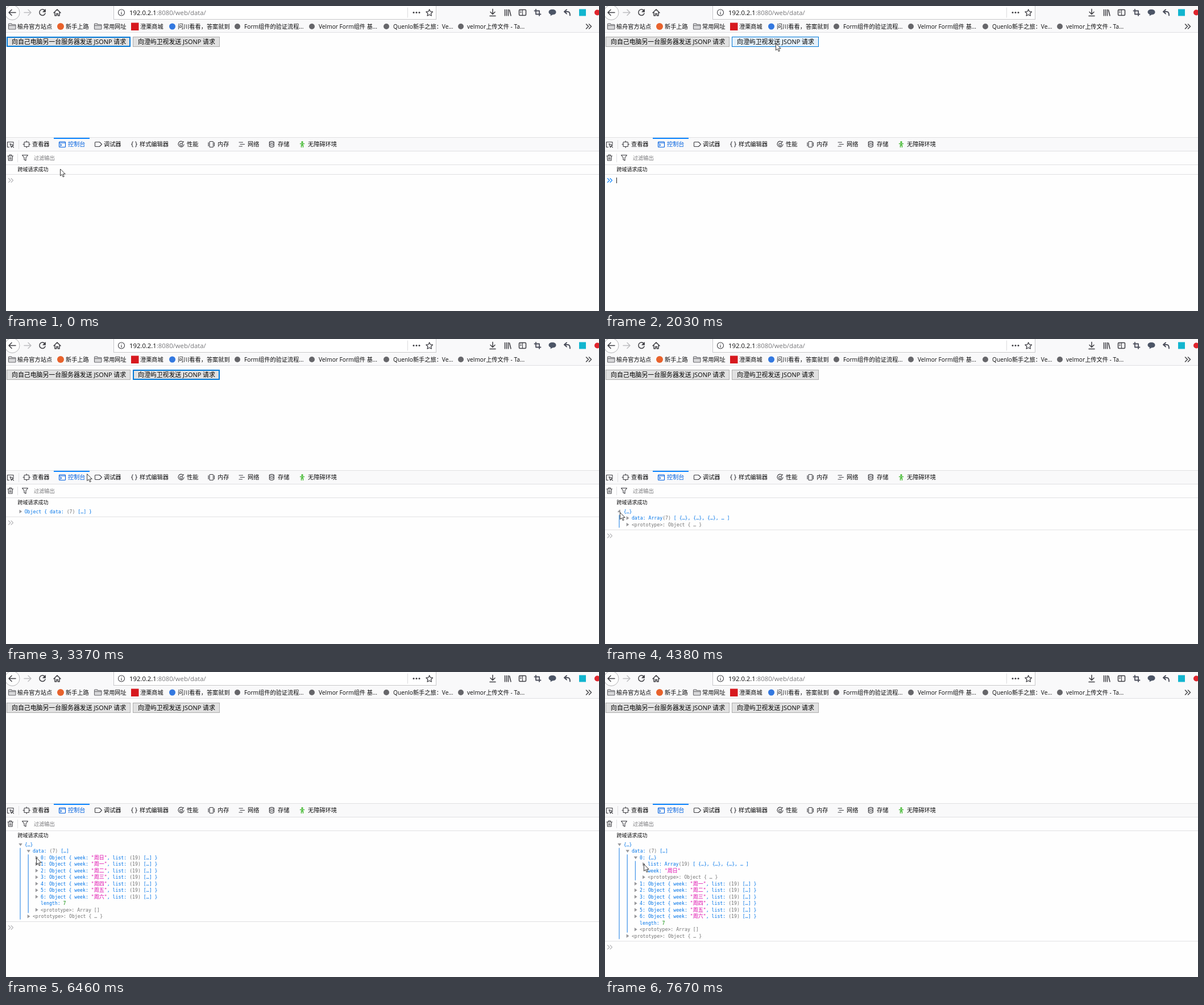
An HTML page that plays this animation: 1043 px wide and 537 px high, repeating every 8 s.

```html
<!DOCTYPE html>
<html lang="zh-CN">
<head>
<meta charset="utf-8">
<title>Console demo</title>
<style>
html, body { margin: 0; width: 100%; height: 100%; overflow: hidden; background: #fefefe; }
svg { display: block; width: 100%; height: 100%; }
text { font: 10.2px "Open Sans", "Noto Sans CJK SC", "Noto Sans CJK", sans-serif; fill: #0c0c0d; white-space: pre; }
.url { font-size: 11.3px; }
.btn text { font-size: 10.9px; fill: #000; }
.small { font-size: 9px; }
.hint { font-size: 9.2px; fill: #77777a; }
.code { font: 8.2px "DejaVu Sans Mono", "Noto Sans CJK SC", monospace; fill: #0074e8; }
.proto, .dim { fill: #737373; }
.str { fill: #dd00a9; }
.num { fill: #058b00; }
.han { font-size: 9px; }
.icon { fill: none; stroke: #3f3f44; stroke-width: 1.5; stroke-linejoin: round; stroke-linecap: round; }
.thin { stroke-width: 1.1; }
.rule { stroke: #e0e0e2; fill: none; }
</style>
</head>
<body>
<svg viewBox="0 0 1043 537" xmlns="http://www.w3.org/2000/svg">
  <defs>
    <g id="folder" class="icon thin">
      <path d="M.5 9.500V1.500Q.5.5 1.500.5H5L6.500 2H12Q13 2 13 3V9.500Q13 10.500 12 10.500H1.500Q.5 10.500.5 9.500ZM.5 4H13" fill="#d8d8da" stroke="#68686c"/>
    </g>
  </defs>
  <rect width="1043" height="537" fill="#fefefe"/>
  <rect width="1043" height="46" fill="#f9f9fa"/>
  <path class="rule" d="M0 46.500H1043"/>

  <!-- navigation bar -->
  <circle cx="11" cy="11.500" r="13" fill="#fdfdfd" stroke="#b5b5b8"/>
  <g class="icon">
    <path d="M17 11.500H5M10 6.500L5 11.500L10 16.500"/>
    <path d="M32 11.500H44M39 6.500L44 11.500L39 16.500" stroke="#bdbdc0"/>
    <path d="M68.500 8.500A5.200 5.200 0 1 0 69 13"/>
    <path d="M69.500 6V10.500H65Z" fill="#3f3f44" stroke-width=".8"/>
    <path d="M84 12L90 6L96 12M86 11.500V17H88.700V13.500H91.300V17H94V11.500"/>
  </g>
  <rect x="189.500" y="-2" width="567" height="25.500" fill="#fff" stroke="#c8c8ca"/>
  <g class="icon thin">
    <circle cx="203" cy="11.500" r="5.500"/>
    <path d="M203 11V14.500M203 8.700V8.800"/>
    <path d="M706.500 3V20" stroke="#dcdcde"/>
    <path d="M744.700 6L746.400 9.700L750.500 10.200L747.500 13L748.300 17.200L744.700 15.200L741.100 17.200L741.900 13L738.900 10.200L743 9.700Z" stroke-width="1.300"/>
  </g>
  <g fill="#3f3f44"><circle cx="717" cy="11.500" r="1.500"/><circle cx="722" cy="11.500" r="1.500"/><circle cx="727" cy="11.500" r="1.500"/></g>
  <text class="url" x="217" y="15.600">192.0.2.1<tspan fill="#77777a">:8080/web/data/</tspan></text>
  <g class="icon">
    <path d="M856 5.500V14M852 10.500L856 14.500L860 10.500M851 17.500H861"/>
    <path d="M877.500 6.500V17M880.500 6.500V17M883.500 6.500V17M885.500 7L888 17"/>
    <rect x="902.500" y="6.500" width="12" height="10" rx="1.500"/><path d="M908.500 6.500V16.500M904.500 9H906.500M904.500 11.500H906.500" stroke-width="1.100"/>
    <path d="M932 6V14.500H940.500M929.500 8.500H938V17" stroke="#4c4f5c" stroke-width="1.800"/>
    <path d="M982.500 10H988Q992 10 992 16.500M986 6.500L982 10L986 13.500" stroke="#4c4f5c" stroke-width="2"/>
  </g>
  <path d="M961 6C965 6 967.500 8 967.500 10.800S965 15.500 961 15.500L957.500 17.500L958 15C955.500 14 954.500 12.500 954.500 10.800C954.500 8 957 6 961 6Z" fill="#4c5566"/>
  <rect x="1008" y="5.500" width="12" height="12" fill="#12b5cf"/>
  <circle cx="1040" cy="11.500" r="5" fill="#e0242c"/>

  <!-- bookmarks -->
  <use href="#folder" x="4" y="30.500"/>
  <use href="#folder" x="155" y="30.500"/>
  <circle cx="96" cy="36" r="6" fill="#e8622c"/>
  <rect x="220" y="29.500" width="13.500" height="13.500" fill="#d7191f"/>
  <circle cx="292.500" cy="36" r="5.500" fill="#3378e0"/>
  <g id="marks"></g>
  <path class="icon" d="M1020.500 32L1024.500 36L1020.500 40M1025.500 32L1029.500 36L1025.500 40"/>

  <!-- page -->
  <g class="btn" id="first"><rect/><text x="10" y="67">向自己电脑另一台服务器发送 JSONP 请求</text></g>
  <g class="btn" id="second"><rect/><text x="232" y="67">向澄屿卫视发送 JSONP 请求</text></g>

  <!-- developer tools -->
  <rect y="232" width="1043" height="23" fill="#f9f9fa"/>
  <path class="rule" d="M0 231.500H1043M0 255.500H1043M0 279.500H1043M22.500 236V252M20.500 260V275"/>
  <rect x="84" y="232" width="63" height="2" fill="#0a84ff"/>
  <g id="tabs"></g>
  <g class="icon thin">
    <path d="M5.500 248.500H2.500V239.500H13V243M7 242.500L13.500 245L10.700 246.200L9.500 249ZM11 246.500L13.500 249"/>
    <rect x="32" y="239.500" width="8.500" height="8" rx="1"/><path d="M30 243.500H32M40.500 243.500H42.500M36.200 237.500V239.500M36.200 247.500V249.500"/>
    <g stroke="#0060df"><rect x="93.500" y="239" width="11" height="9.500" rx="1"/><path d="M93.500 241H104.500M95.500 243.200L97.500 244.800L95.500 246.500"/></g>
    <path d="M157.500 239.500H164.500L168.500 243.500L164.500 247.500H157.500Q156.500 247.500 156.500 246.500V240.500Q156.500 239.500 157.500 239.500Z"/>
    <path d="M223.500 239Q222 239 222 240.500V242.500L220.700 243.500L222 244.500V246.500Q222 248 223.500 248M227.500 239Q229 239 229 240.500V242.500L230.300 243.500L229 244.500V246.500Q229 248 227.500 248"/>
    <path d="M311.500 239.500A5 5 0 1 0 313 243.500"/><circle cx="308" cy="244" r="2.200"/><path d="M309.500 242.500L312.500 238.500"/>
    <rect x="358" y="238.500" width="6.500" height="10" rx="1"/><path d="M356 240.500V246.500M366.500 240.500V246.500"/>
    <path d="M410 240H416.500M412 243.500H419.500M410 247H415.500"/>
    <ellipse cx="467.300" cy="240" rx="4" ry="1.600"/><path d="M463.300 240V247Q467.300 250 471.300 247V240M463.300 243.500Q467.300 246.500 471.300 243.500"/>
    <g stroke="#3fb82c" stroke-width="1.400"><circle cx="521" cy="239.800" r="1"/><path d="M517.500 242.500H524.500M521 242.500V245M519.500 248.500V245H522.500V248.500"/></g>
    <path d="M3 264H12.500M6 263.500V262H9.500V263.500M4 264.500L4.500 272H11L11.500 264.500M6.700 266.500V270M8.800 266.500V270"/>
    <path d="M28.500 262.500H38.500L35 267V272L32 270.500V267Z"/>
  </g>
  <text class="hint" x="49" y="270.700">过滤输出</text>
  <text class="small" x="20.500" y="290.500">跨域请求成功</text>
  <g id="trees"></g>
  <g id="prompt">
    <path class="rule" d="M0 -10.500H1043"/>
    <path id="chevron" class="icon thin" d="M4.500 -3.500L8 0L4.500 3.500M9 -3.500L12.500 0L9 3.500"/>
    <path id="caret" d="M20.500 -5V5" stroke="#222"/>
  </g>
  <path id="cursor" d="M.5.5V12.500L3.300 10L5.300 14.500L7.200 13.700L5.300 9.300H9.200Z" fill="#fff" stroke="#222" stroke-width=".9"/>
</svg>
<script>
const $ = id => document.getElementById(id);
const LOOP = 8000, ROW = 11.5, TOP = 303.7, INDENT = 14.2;

const labels = (id, y, list) => {
  $(id).innerHTML = list.map(([x, s, color]) =>
    `<text x="${x}" y="${y}"${color ? ` style="fill:${color}"` : ''}>${s}</text>`).join('');
};
labels('marks', 39.9, [
  [20, '榆舟官方站点'], [105, '新手上路'], [171, '常用网址'], [236, '澄栗商城'],
  [302, '问川看看，答案就到'], [419, 'Form组件的验证流程...'], [550, 'Velmor Form组件 基...'],
  [681, 'Quenlo新手之旅：Ve...'], [811, 'velmor上传文件 - Ta...']
]);
for (let i = 0; i < 4; i++)
  $('marks').innerHTML += `<circle cx="${407 + i * 131}" cy="36" r="5" fill="#66666a"/>`;
labels('tabs', 247.2, [
  [46, '查看器'], [109, '控制台', '#0060df'], [172, '调试器'], [235, '样式编辑器'],
  [318, '性能'], [372, '内存'], [425, '网络'], [478, '存储'], [531, '无障碍环境']
]);

// Object tree: each row is [level, text, twisty], twisty being 'open', 'shut' or ''.
const days = [...'日一二三四五六'].map((d, i) =>
  [2, `${i}: Object { week: "周${d}", list: (19) […] }`, 'shut']);
const root = [0, '{…}', 'open'], data = [1, 'data: (7) […]', 'open'];
const proto = (level, type) => [level, `<prototype>: ${type}`, 'shut'];
const tail = [[2, 'length: 7', ''], proto(2, 'Array []'), proto(1, 'Object { … }')];
const trees = [
  [],
  [[0, 'Object { data: (7) […] }', 'shut']],
  [root, [1, 'data: Array(7) [ {…}, {…}, {…}, … ]', 'shut'], proto(1, 'Object { … }')],
  [root, data, ...days, ...tail],
  [root, data, [2, '0: {…}', 'open'], [3, 'list: Array(19) [ {…}, {…}, {…}, … ]', 'shut'],
    [3, 'week: "周日"', ''], proto(3, 'Object { … }'), ...days.slice(1), ...tail]
];

const span = (cls, s) => `<tspan class="${cls}">${s}</tspan>`;
const paint = s => s.split(/("[^"]*"|\(\d+\)|7$)/).map(p =>
  p[0] === '"' ? span('str', `"${span('han', p.slice(1, -1))}"`) :
  p[0] === '(' ? span('dim', p) :
  p === '7' ? span('num', p) : p.replace(/</g, '&lt;')).join('');

function drawTree(rows, stage) {
  let out = '';
  rows.forEach(([level, s, twisty], i) => {
    const x = 25.5 + level * INDENT, y = TOP + i * ROW;
    if (twisty) {
      const turn = twisty === 'open' ? 90 : 0;
      const fresh = turn && level === stage - 2 ? ' class="fresh"' : '';
      out += `<path${fresh} d="M-2 -3.200L2.700 0L-2 3.200Z" fill="#98989b" transform="translate(${x} ${y}) rotate(${turn})"/>`;
    }
    if (twisty === 'open') {
      let end = i + 1;
      while (end < rows.length && rows[end][0] > level) end++;
      out += `<path d="M${x - .5} ${y + 6}V${TOP + end * ROW - 6}" stroke="#4a98ea" stroke-width="1.300"/>`;
    }
    out += `<text class="code${s[0] === '<' ? ' proto' : ''}" x="${x + 7.200}" y="${y + 2.900}">${paint(s)}</text>`;
  });
  return `<g>${out}</g>`;
}
$('trees').innerHTML = trees.map(drawTree).join('');
const groups = [...$('trees').children];

// Screen updates come in bursts: [first, last, count].
const bursts = [[0, 0, 1], [120, 390, 3], [830, 1760, 8], [1880, 2150, 3], [2430, 2580, 2],
  [2950, 3950, 8], [4260, 5160, 8], [5440, 6460, 9], [6740, 7670, 8]];
function snap(t) {
  const [from, to, n] = bursts.filter(b => b[0] <= t).pop();
  if (n < 2) return from;
  const step = (to - from) / (n - 1);
  return from + Math.min(n - 1, Math.floor((t - from) / step + .1)) * step;
}

const path = [[0, 95, 286.5], [830, 96, 291], [963, 110, 310], [1096, 139, 321], [1229, 200, 245],
  [1361, 267, 142], [1494, 284, 106], [1627, 294, 82], [1760, 297, 74], [1880, 299, 68],
  [2150, 301, 63], [2950, 301, 63], [3100, 280, 85], [3250, 215, 160], [3400, 130, 250],
  [3550, 70, 290], [3700, 40, 302], [3950, 26, 305], [4390, 26, 305], [5160, 42, 316],
  [5570, 42, 316], [6460, 53, 326.5], [6870, 53, 326.5], [7670, 68, 338], [LOOP, 68, 338]];
function locate(t) {
  const i = path.findIndex(p => p[0] > t);
  const [t0, x0, y0] = path[i - 1], [t1, x1, y1] = path[i];
  const k = (t - t0) / (t1 - t0);
  return [x0 + (x1 - x0) * k, y0 + (y1 - y0) * k];
}

const looks = {
  idle: ['#e1e1e1', '#adadad', 1], focus: ['#e1e1e1', '#0078d7', 2],
  hover: ['#e5f1fb', '#0078d7', 1], press: ['#cce4f7', '#0078d7', 1]
};
function setButton(id, x, width, look) {
  const [fill, stroke, w] = looks[look];
  const box = { x: x + w / 2, y: 54 + w / 2, width: width - w, height: 18 - w, fill, stroke, 'stroke-width': w };
  for (const key in box) $(id).firstChild.setAttribute(key, box[key]);
}

const opens = [2950, 4380, 5440, 6740];
function draw(time) {
  const t = snap(time);
  const stage = opens.filter(o => o <= t).length;
  groups.forEach((g, i) => { g.style.display = i === stage ? '' : 'none'; });
  const turning = stage > 1 && t - opens[stage - 1] < 120;
  const fresh = groups[stage].querySelector('.fresh');
  if (fresh) fresh.setAttribute('transform',
    fresh.getAttribute('transform').replace(/rotate\(.*\)/, `rotate(${turning ? 45 : 90})`));

  setButton('first', 1, 218, t < 120 ? 'focus' : 'idle');
  setButton('second', 223, 153, t < 1880 || t >= 4260 ? 'idle' :
    t < 2430 ? 'hover' : t < 2580 ? 'press' : t < 2950 ? 'hover' : 'focus');

  const typing = t >= 960 && t < 2430;
  const y = stage ? 312 + (trees[stage].length - 1) * ROW + 11.5 : 307;
  $('prompt').setAttribute('transform', `translate(0 ${y})`);
  $('chevron').style.stroke = typing ? '#0a84ff' : '#b4b4b7';
  $('caret').style.display = typing && Math.floor((t - 960) / 500) % 2 === 0 ? '' : 'none';
  $('cursor').setAttribute('transform', `translate(${locate(t).join(' ')})`);
}

const start = performance.now();
function tick() {
  draw((performance.now() - start) % LOOP);
  requestAnimationFrame(tick);
}
tick();
</script>
</body>
</html>
```
